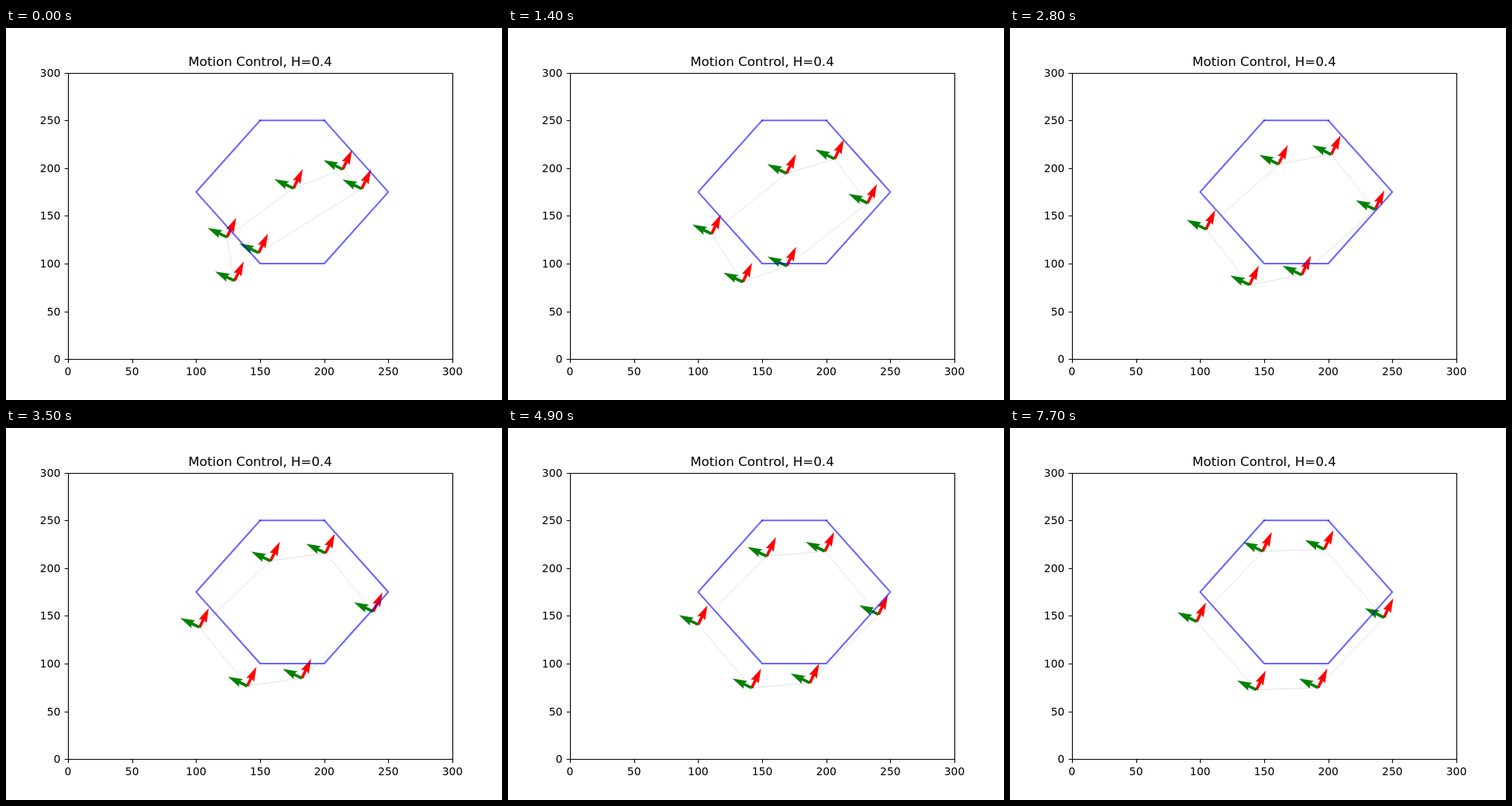
Recreate the animation shown at these times as an HTML page. Size 640 by 480 pixels, loop 8000 ms.

```html
<!DOCTYPE html>
<html lang="en">
<head>
<meta charset="utf-8">
<title>Motion Control</title>
<style>
  html, body { margin: 0; width: 100%; height: 100%; overflow: hidden; background: #fff; }
  svg { display: block; width: 640px; height: 480px; }
  text { font: 13.89px "DejaVu Sans", sans-serif; }
  .title { font-size: 16.67px; text-anchor: middle; }
  .axis { fill: none; stroke: #000; stroke-width: 1.11; }
  .hexagon { fill: none; stroke: #00f; stroke-opacity: .6; stroke-width: 2.08; stroke-linecap: square; stroke-linejoin: round; }
  .link { stroke: #000; stroke-opacity: .45; stroke-width: .69; stroke-dasharray: .69 1.15; }
</style>
</head>
<body>
<svg id="stage" viewBox="0 0 640 480"></svg>
<script>
const STEP_MS = 700, LOOP_MS = 8000, GAIN = 0.2;
const HEADING = 64.2, ARROW = 27.56, SHAFT = 3.72;

const px = x => 80 + x * 496 / 300;
const py = y => 427.2 - y * 369.6 / 300;
const snap = v => Math.floor(v + 0.5) + 0.5;
const points = list => list.map(([x, y]) => `${px(x)},${py(y)}`).join(" ");

const stage = document.getElementById("stage");
function add(tag, attrs, parent = stage, text = "") {
  const el = document.createElementNS("http://www.w3.org/2000/svg", tag);
  for (const name in attrs) el.setAttribute(name, attrs[name]);
  el.textContent = text;
  parent.append(el);
  return el;
}

const formation = [[150, 250], [200, 250], [250, 175], [200, 100], [150, 100], [100, 175]];
const start = [[176, 178.8], [214.4, 198.7], [229.2, 178.4], [148.8, 111.3], [129.9, 82], [124, 127.7]];

// Each agent moves towards its two ring neighbours, offset by the formation.
function advance(agents) {
  const error = agents.map((p, i) => p.map((v, k) => v - formation[i][k]));
  return agents.map((p, i) => p.map((v, k) =>
    v + GAIN * (error[(i + 1) % 6][k] + error[(i + 5) % 6][k] - 2 * error[i][k])));
}

const states = [start];
while (states.length * STEP_MS < LOOP_MS) states.push(advance(states[states.length - 1]));

function addArrow(parent, angle, fill) {
  const w = SHAFT / 2, neck = ARROW - 4.5 * SHAFT, barb = ARROW - 5 * SHAFT;
  add("path", {
    d: `M0 ${-w}H${neck}L${barb} ${-3 * w}L${ARROW} 0L${barb} ${3 * w}L${neck} ${w}H0Z`,
    transform: `rotate(${-angle})`, fill
  }, parent);
}

const robots = start.map(() => {
  const group = add("g", {});
  addArrow(group, HEADING, "#f00");
  addArrow(group, HEADING + 90, "#008000");
  return group;
});
const links = start.map(() => add("line", { class: "link" }));

// The top edge is a separate stroke, so its ends overlap the outline.
add("polyline", { class: "hexagon", points: points([...formation.slice(1), formation[0]]) });
add("polyline", { class: "hexagon", points: points(formation.slice(0, 2)) });

add("path", { class: "axis", d: "M80.5 58.5H576.5V427.5H80.5Z", "stroke-linejoin": "miter" });
for (let v = 0; v <= 300; v += 50) {
  add("path", { class: "axis", d: `M${snap(px(v))} 427.5v4.86M80.5 ${snap(py(v))}h-4.86` });
  add("text", { x: px(v), y: 448, "text-anchor": "middle" }, stage, v);
  add("text", { x: 70.3, y: Math.round(py(v) + 5), "text-anchor": "end" }, stage, v);
}
add("text", { class: "title", x: 328, y: 49 }, stage, "Motion Control, H=0.4");

function draw(time) {
  const agents = states[Math.floor((time % LOOP_MS) / STEP_MS)];
  agents.forEach(([x, y], i) => {
    const [nx, ny] = agents[(i + 1) % 6];
    robots[i].setAttribute("transform", `translate(${px(x)} ${py(y)})`);
    const ends = { x1: px(x), y1: py(y), x2: px(nx), y2: py(ny) };
    for (const name in ends) links[i].setAttribute(name, ends[name]);
  });
}

let origin;
function tick(now) {
  origin ??= now;
  draw(now - origin);
  requestAnimationFrame(tick);
}
draw(0);
requestAnimationFrame(tick);
</script>
</body>
</html>
```
